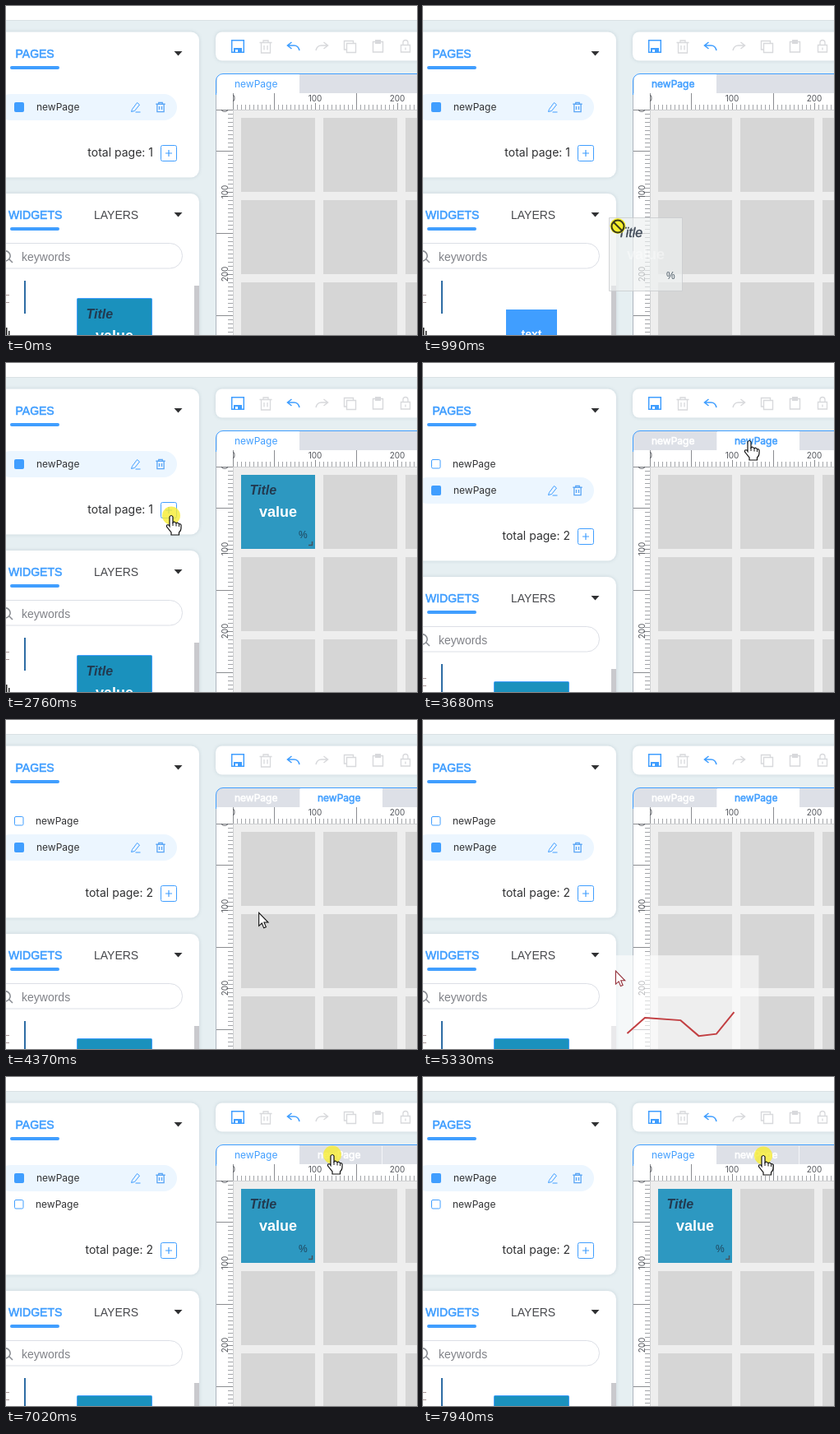
These frames come from a looping animation (500 by 400 pixels, 8000 ms). An HTML page with a canvas:

```html
<!DOCTYPE html>
<html lang="en">
<head>
<meta charset="utf-8">
<title>Dashboard editor</title>
<style>
html, body { margin: 0; width: 100%; height: 100%; overflow: hidden; background: #e6eff2; }
canvas { display: block; width: 500px; height: 400px; }
</style>
</head>
<body>
<canvas id="stage" width="500" height="400"></canvas>
<script>
const c = document.getElementById('stage').getContext('2d');
const LOOP = 8000;
const BLUE = '#409eff', GREY = '#d8d9dc', DARK = '#303133';
const UI = 'Inter, sans-serif', ARIAL = '"Liberation Sans", Arial, sans-serif';

// Cursor stops: time, x, y, and 1 where the move towards the stop is linear
const PATH = [
  [0, 150, 430], [130, 150, 425], [450, 112, 372], [520, 112, 372],
  [910, 237, 268], [990, 237, 268], [1480, 302, 152], [1600, 302, 152],
  [1840, 255, 124], [2610, 201, 186], [3220, 201, 186], [3530, 397, 95],
  [3720, 397, 95], [4370, 308, 234], [4530, 250, 290, 1], [4720, 180, 425, 1],
  [5080, 185, 415], [5640, 302, 155], [5940, 302, 155], [6220, 305, 95],
  [6760, 305, 95], [7000, 397, 95], [7240, 397, 95], [7480, 310, 95],
  [7620, 310, 95], [7880, 414, 96], [8000, 414, 96]
];
const PRESSES = [[520, 1480], [2690, 2840], [3530, 3680], [5080, 5720],
  [6220, 6300], [7000, 7170], [7480, 7560], [7900, 8000]];
const within = (t, a, b) => t >= a && t < b;

function cursorAt(t) {
  const i = PATH.findIndex(p => p[0] > t);
  const a = PATH[i - 1], b = PATH[i];
  let k = (t - a[0]) / (b[0] - a[0]);
  if (!b[3]) k = k * k * (3 - 2 * k);
  return { x: a[1] + (b[1] - a[1]) * k, y: a[2] + (b[2] - a[2]) * k };
}

function rect(x, y, w, h, fill) {
  c.fillStyle = fill;
  c.fillRect(x, y, w, h);
}

function round(x, y, w, h, r, fill, stroke) {
  c.beginPath();
  c.roundRect(x, y, w, h, r);
  if (fill) { c.fillStyle = fill; c.fill(); }
  if (stroke) { c.strokeStyle = stroke; c.lineWidth = 1; c.stroke(); }
}

function line(points, color, width = 1) {
  c.beginPath();
  for (let i = 0; i < points.length; i += 2) c.lineTo(points[i], points[i + 1]);
  c.strokeStyle = color;
  c.lineWidth = width;
  c.stroke();
}

function text(s, x, y, font, color, fat = 0, align = 'left') {
  c.font = font;
  c.textAlign = align;
  c.fillStyle = c.strokeStyle = color;
  c.fillText(s, x, y);
  if (fat) { c.lineWidth = fat; c.strokeText(s, x, y); }
}

function at(x, y, draw) {
  c.save();
  c.translate(x, y);
  draw();
  c.restore();
}

function path(d, stroke, width = 1, fill) {
  const p = new Path2D(d);
  if (fill) { c.fillStyle = fill; c.fill(p); }
  if (stroke) { c.strokeStyle = stroke; c.lineWidth = width; c.stroke(p); }
}

function panel(x, y, w, h, r) {
  c.save();
  c.shadowColor = 'rgba(90,120,135,.22)';
  c.shadowBlur = 4;
  round(x, y, w, h, r, '#fff');
  c.restore();
}

const caret = (x, y) => path(`M${x - 5} ${y}h10l-5 5.5z`, null, 1, DARK);

function trash(x, y, color, s = 1) {
  at(x, y, () => {
    c.scale(s, s);
    path('M-7.5-5h15M-3-5v-2.5h6V-5M-5.5-5V7.5h11V-5M-2-1.5V4M2-1.5V4', color, 1.3 / s);
  });
}

function toolbar() {
  panel(255, 31.5, 260, 35, 8);
  path('M274.7 41.7h14.6v14.6h-14.6z', BLUE, 1.5);
  rect(277, 51, 10, 5, BLUE);
  rect(279, 53, 3, 3, '#fff');
  trash(316, 49.5, GREY);
  const undo = 'M-2-5L-7-1L-2 3M-7-1H1Q6-1 7.5 5';
  at(349.5, 49, () => path(undo, BLUE, 1.6));
  at(384.5, 49, () => { c.scale(-1, 1); path(undo, GREY, 1.5); });
  path('M414.5 45.5h11v11h-11zM414 53h-2.5V42.500h11V45', GREY, 1.4);
  path('M446.500 43.500h12v12.500h-12z', GREY, 1.4);
  rect(449, 41, 7, 5, GREY);
  path('M480.500 47.500h11v8.500h-11zM483 47v-2.500a3 3 0 0 1 6 0V47M486 50.500v3', GREY, 1.3);
}

function pageRow(y, active) {
  if (active) {
    round(-10, y - 16, 218, 32, 16, '#ecf6ff');
    round(10, y - 6, 12, 12, 2, BLUE);
    at(157.500, y, () => path('M-4 2.500L2-5.500L5-3L-1 4.500L-5 5.500zM0 6h6', BLUE, 1));
    trash(188, y, '#5aa5f5', 0.75);
  } else {
    round(10.500, y - 5.500, 10.500, 10.500, 1.500, '#fff', BLUE);
  }
  text('newPage', active ? 37 : 36, y + 4, '12px ' + UI, DARK);
}

function pagesPanel(count, active) {
  const dy = (count - 1) * 32;
  panel(-20, 31.500, 255, 177 + dy, 10);
  text('PAGES', 11.500, 63, '14px ' + ARIAL, BLUE, 0.6);
  round(5, 73, 60, 4, 2, BLUE);
  caret(209.500, 55);
  for (let i = 0; i < count; i++) pageRow(123 + i * 32, i === active);
  text('total page: ' + count, 179, 183 + dy, '14px ' + UI, DARK, 0, 'right');
  round(188.500, 169.500 + dy, 19, 19, 2, '#fff', BLUE);
  path(`M194 ${179 + dy}h8M198 ${175 + dy}v8`, BLUE, 1.2);
}

function widgetsPanel(dy, picked) {
  at(0, dy, () => {
    panel(-20, 228, 255, 300, 10);
    text('WIDGETS', 3, 259, '14px ' + ARIAL, BLUE, 0.6);
    round(5, 269, 60, 4, 2, BLUE);
    text('LAYERS', 107, 259, '14px ' + ARIAL, '#48494d');
    caret(209.500, 251);
    round(-20, 288.500, 234.500, 30.500, 15, '#fff', '#dcdfe6');
    path('M-4 309a6 6 0 1 0 2-11M4 308l4 4', '#8b8e94', 1.6);
    text('keywords', 19, 310, '14px ' + ARIAL, '#808288');
    rect(229, 340, 6, 100, '#c9c9cd');
    rect(22, 334, 2, 40, '#2e6da4');
    path('M0 351.500h4M-1 360.500h5', '#a99', 1);
    rect(0, 391, 1.500, 10, '#222');
    rect(3, 395, 1.500, 10, '#222');
    if (picked) {
      rect(101, 369, 62, 40, BLUE);
      text('text', 132, 404, 'bold 14px ' + ARIAL, '#fff', 0, 'center');
    } else {
      round(86.500, 355.500, 91, 91, 1, '#1a91bd', BLUE);
      valueLabels(87, 356, '#fff');
    }
  });
}

function valueLabels(x, y, white) {
  text('Title', x + 10.500, y + 24, 'italic bold 16px ' + ARIAL, '#223a50');
  text('value', x + 45, y + 51, 'bold 18px ' + ARIAL, white, 0, 'center');
  text('%', x + 70, y + 77, '12px ' + ARIAL, '#20455c');
}

const corner = (x, y) => line([x, y - 0.500, x - 5, y - 0.500, x - 0.500, y - 0.500, x - 0.500, y - 5], '#46535c', 1.5);

function valueWidget(x, y) {
  rect(x, y, 90, 90, '#2d98c1');
  valueLabels(x, y, '#fff');
  corner(x + 87, y + 86);
}

function valueGhost(x, y) {
  round(x + 0.500, y + 0.500, 89, 89, 0, 'rgba(238,240,240,.68)', 'rgba(200,203,205,.8)');
  text('Title', x + 11, y + 24, 'italic 16px ' + ARIAL, '#414b59', 0.4);
  text('value', x + 45, y + 51, 'bold 18px ' + ARIAL, 'rgba(255,255,255,.4)', 0, 'center');
  text('%', x + 70, y + 75, '12px ' + ARIAL, '#4b5a66');
}

function chart(x, y, alpha) {
  rect(x, y, 190, 190, `rgba(255,255,255,${alpha})`);
  at(x, y, () => line([30, 95, 51.500, 76, 95, 79, 117, 98, 138.500, 95.500, 160, 69], '#c23f42', 2));
  corner(x + 187, y + 187);
}

function tabs(count, active, fat) {
  rect(256, 83, 244, 23, '#dde0e7');
  for (let i = 0; i < count; i++) {
    const on = i === active;
    if (on) rect(257 + i * 101, 83, 100, 23, '#fff');
    else rect(357 + i * 100, 84, 1, 22, '#f4f5f8');
    text('newPage', 278 + i * 101, 99, '12px ' + UI, on ? BLUE : '#fff', on ? fat : 0.6);
  }
}

function rulers() {
  rect(256, 106, 244, 20, '#fff');
  rect(256, 106, 20, 294, '#fff');
  const tick = '#a3a5a9';
  for (let i = 0; i <= 54; i++) {
    const d = i * 5;
    const len = i % 20 === 0 && i ? 8 : i % 10 === 0 ? 20 : 6;
    rect(276 + d, 126 - len, 1, len, len > 6 ? '#8b8d91' : tick);
    rect(276 - len, 126 + d, len, 1, len > 6 ? '#8b8d91' : tick);
  }
  const font = '10px ' + UI;
  c.save();
  c.beginPath();
  c.rect(276, 106, 224, 20);
  c.rect(256, 126, 20, 274);
  c.clip();
  for (let v = 0; v <= 200; v += 100) {
    text(v, 376 + v - 100, 116, font, '#53565c', 0, 'center');
    at(270, 126 + v, () => {
      c.rotate(-Math.PI / 2);
      text(v, 0, 0, font, '#53565c', 0, 'center');
    });
  }
  c.restore();
  rect(276, 126, 224, 1, '#cfd0d2');
  rect(276, 126, 1, 274, '#cfd0d2');
}

function editor(s) {
  c.save();
  c.beginPath();
  c.roundRect(255, 82, 300, 400, [9, 0, 0, 0]);
  c.clip();
  rect(255, 82, 245, 318, '#eee');
  for (let x = 286; x < 500; x += 100)
    for (let y = 136; y < 400; y += 100) rect(x, y, 90, 90, '#d6d6d6');
  if (s.active === 0 && s.placed) valueWidget(286, 136);
  if (s.active === 1 && s.charted) chart(286, 136, 0.9);
  tabs(s.pages, s.active, s.dragValue || s.active ? 0.5 : 0);
  rulers();
  c.restore();
  line([255.500, 108, 255.500, 400], '#aeb6bf');
  path('M255.500 108V91a8.500 8.500 0 0 1 8.500-8.500H500', BLUE, 1);
}

function pointer(p, s) {
  if (s.pressed && !s.dragChart) {
    c.beginPath();
    c.arc(p.x, p.y - 0.500, s.dragValue ? 9.500 : 11, 0, 7);
    c.fillStyle = s.dragValue ? '#f4ee2d' : 'rgba(246,236,50,.8)';
    c.fill();
  }
  const onTab = within(p.y, 84, 106) && within(p.x, 256, 357 + (s.pages - 1) * 100);
  const plusY = 169 + (s.pages - 1) * 32;
  const onPlus = within(p.x, 188, 209) && within(p.y, plusY, plusY + 20);
  at(p.x, p.y, () => {
    if (s.dragValue && p.x < 276) {
      c.beginPath();
      c.arc(0, 0, 7.500, 0, 7);
      c.strokeStyle = '#3a3a1c';
      c.lineWidth = 2;
      c.stroke();
      line([-5.500, -5.500, 5.500, 5.500], '#3a3a1c', 2);
    } else if (onTab || onPlus) {
      path('M-2 1Q0-2 2 1V8Q4 6 6 9Q8 7 9.500 10Q11 9 12 11V15Q12 18 9.500 20V23H0V20L-5.500 13Q-6 10-3 11L-2 12.500z', '#111', 1.2, '#fff');
      path('M2 8v4M6 9.500v3M9.500 10.500v2.500', '#111', 1);
    } else {
      path('M0 0V16L3.700 12.700L6 18.500L8.700 17.300L6.300 11.700H11.300z', s.dropInk ? '#94303a' : '#111', 1.1, '#fff');
    }
  });
}

function stateAt(t) {
  return {
    pages: t < 2840 ? 1 : 2,
    active: within(t, 3680, 6300) || within(t, 7170, 7560) ? 1 : 0,
    placed: t >= 1480,
    charted: t >= 5720,
    dragValue: within(t, 520, 1480),
    dragChart: within(t, 5080, 5720),
    dropInk: within(t, 5080, 5940),
    pressed: PRESSES.some(([a, b]) => within(t, a, b))
  };
}

function render(t) {
  const s = stateAt(t), p = cursorAt(t);
  rect(0, 0, 500, 400, '#e6eff2');
  rect(0, 0, 500, 17, '#fff');
  rect(0, 17, 500, 1, '#d9e1e4');
  pagesPanel(s.pages, s.active);
  widgetsPanel((s.pages - 1) * 32, s.dragValue);
  toolbar();
  editor(s);
  if (s.dragValue) valueGhost(p.x - 11, p.y - 11);
  if (s.dragChart) chart(p.x - 16, p.y - 19, 0.6);
  pointer(p, s);
}

const start = performance.now();
function frame() {
  render((performance.now() - start) % LOOP);
  requestAnimationFrame(frame);
}
frame();
</script>
</body>
</html>
```
